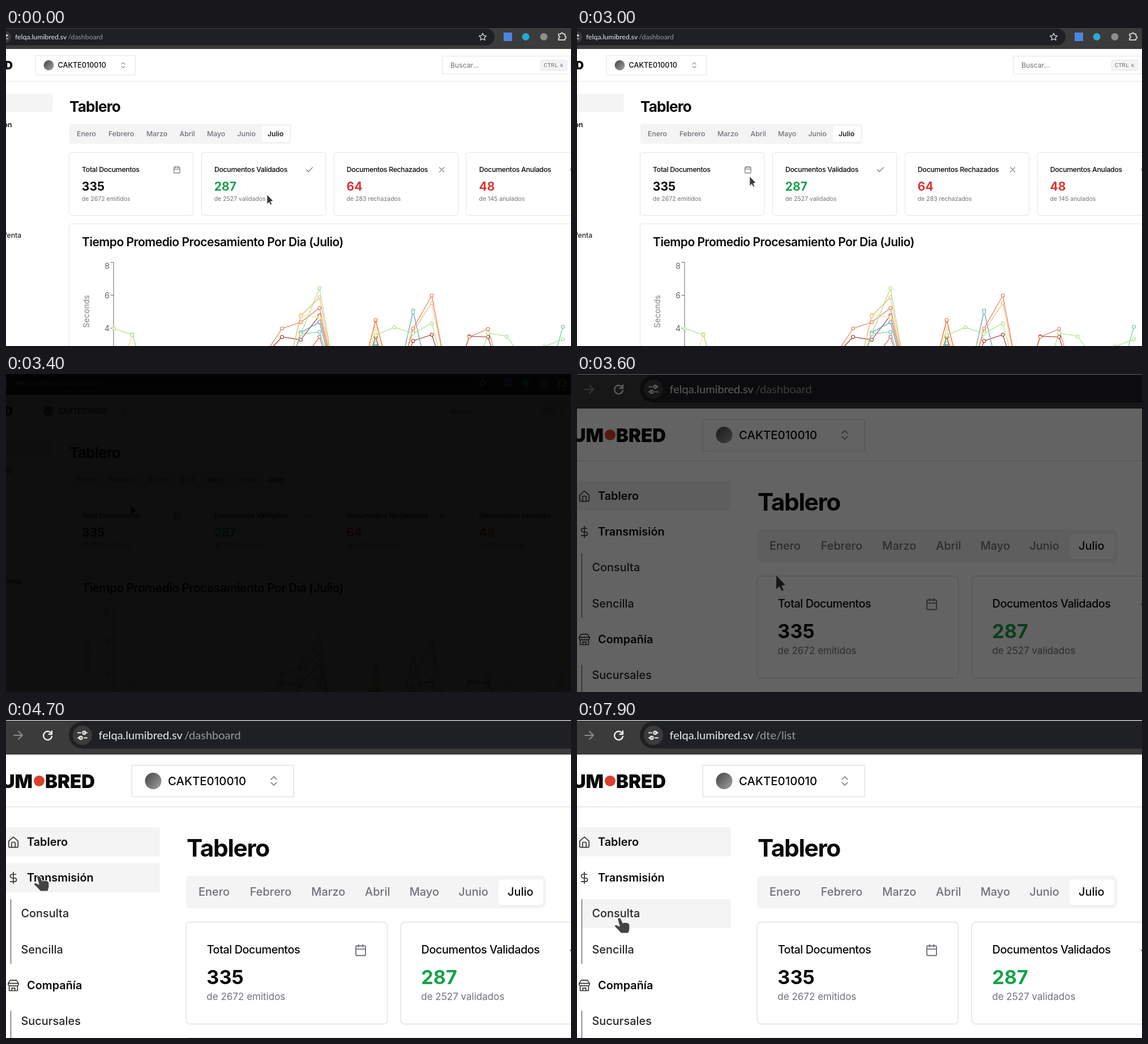
An HTML page that plays this animation: 998x561 px, repeating every 8000 ms.

```html
<!DOCTYPE html>
<html lang="es">
<head>
<meta charset="utf-8">
<title>Tablero</title>
<style>
html, body { margin: 0; width: 100%; height: 100%; overflow: hidden; background: #fff; }
svg { display: block; width: 100vw; height: 100vh; }
text { font-family: Inter, sans-serif; white-space: pre; }
.url { font-family: Lato, sans-serif; }
.mono { font-family: "Liberation Mono", monospace; }
</style>
</head>
<body>
<svg id="stage" viewBox="0 0 998 561"></svg>
<script>
const ZOOM = 1.62, DX = 137.6, DY = 1, CUT = 3425, LOOP = 8000;
const INK = '#09090b', GRAY = '#71717a', LINE = '#e4e4e7', SOFT = '#f4f4f5';

function el(parent, tag, attrs, content) {
  const node = document.createElementNS('http://www.w3.org/2000/svg', tag);
  for (const k in attrs) node.setAttribute(k, attrs[k]);
  if (content) node.textContent = content;
  return parent.appendChild(node);
}
const rect = (p, x, y, x2, y2, fill, more) =>
  el(p, 'rect', { x, y, width: x2 - x, height: y2 - y, fill, ...more });
const text = (p, x, y, size, weight, fill, str, more) =>
  el(p, 'text', { x, y, 'font-size': size, 'font-weight': weight, fill, ...more }, str);
const path = (p, d, stroke, width, more) =>
  el(p, 'path', { d, stroke, 'stroke-width': width, fill: 'none',
    'stroke-linecap': 'round', 'stroke-linejoin': 'round', ...more });
// Icon drawn on a 24 unit grid around a centre
const icon = (p, d, cx, cy, size, color, width = 2) =>
  path(p, d, color, width, { transform: `translate(${cx - size / 2} ${cy - size / 2}) scale(${size / 24})` });

const stage = document.getElementById('stage');
const page = el(stage, 'g', {});

// Browser bar
rect(page, -100, 0, 1000, 37, '#3b3b3b');
rect(page, -16.4, 1, 863, 30.5, '#1f2023', { rx: 14.7 });
icon(page, 'M12 2l3.1 6.6 7 .9-5.1 4.9 1.3 7.1-6.3-3.5-6.3 3.5 1.3-7.1L1.900 9.500l7-.9z', 842, 15.500, 15, '#d6d6d6', 2.200);
rect(page, 879, 8, 894, 23, '#4a86e0');
el(page, 'circle', { cx: 918, cy: 15.500, r: 6.500, fill: '#28a9d6' });
el(page, 'circle', { cx: 950, cy: 15.500, r: 6.500, fill: '#8d8d8d' });
icon(page, 'M3 6h6a3 3 0 0 1 6 0h5v6a3 3 0 0 1 0 6v4H3v-5a3 3 0 0 0 0-6z', 982, 14.500, 16, '#e6e6e6', 2.400);

// Header
rect(page, -100, 93.500, 1000, 94.500, LINE);
rect(page, 770.500, 49.500, 996.500, 81, '#fff', { stroke: LINE });
text(page, 785, 70, 12.300, 400, GRAY, 'Buscar...');
rect(page, 944.500, 56.500, 991, 74.500, SOFT, { stroke: LINE, rx: 2 });
text(page, 950, 69, 10.500, 400, GRAY, 'CTRL', { class: 'mono' });
text(page, 979, 69, 9, 400, GRAY, 'K', { class: 'mono' });

// Month tabs
text(page, 112, 148, 26.200, 700, INK, 'Tablero', { 'letter-spacing': '-.033em' });
rect(page, 111.500, 169, 504, 204.500, SOFT, { rx: 5 });
rect(page, 452, 173.500, 501, 202, '#e6e6e9', { rx: 4 });
rect(page, 452, 173, 501, 201.300, '#fff', { rx: 4 });
Object.entries({ Enero: 125, Febrero: 181, Marzo: 248, Abril: 306.500, Mayo: 355, Junio: 408.500, Julio: 462 })
  .forEach(([name, x]) => text(page, x, 191, 12.300, 500, name === 'Julio' ? INK : GRAY, name));

// Summary cards
const CALENDAR = 'M8 2v4M16 2v4M3 10h18M5 4h14a2 2 0 0 1 2 2v14a2 2 0 0 1-2 2H5a2 2 0 0 1-2-2V6a2 2 0 0 1 2-2z';
[
  ['Total Documentos', '335', 'de 2672 emitidos', INK, CALENDAR],
  ['Documentos Validados', '287', 'de 2527 validados', '#16a34a', 'M22 5L9 18l-6-6'],
  ['Documentos Rechazados', '64', 'de 283 rechazados', '#dc3535', 'M19 5L5 19M5 5l14 14'],
  ['Documentos Anulados', '48', 'de 145 anulados', '#dc3535', 'M12 2a10 10 0 1 0 .1 0zM5 5l14 14']
].forEach(([title, count, note, color, sign], i) => {
  const x = 111.500 + i * 233.900;
  rect(page, x, 219.500, x + 219.300, 330.500, '#fff', { rx: 4.500, stroke: LINE });
  text(page, x + 22.500, 254, 12.300, 500, INK, title, { 'letter-spacing': '-.025em' });
  text(page, x + 22.300, 287, 21.100, 700, color, count);
  text(page, x + 22.300, 304.500, 10.500, 400, GRAY, note);
  icon(page, sign, x + 190.300, 250, 14, GRAY);
});

// Chart
rect(page, 111.500, 345.500, 1060, 800, '#fff', { rx: 4.500, stroke: LINE });
text(page, 134, 384.500, 21.100, 600, INK, 'Tiempo Promedio Procesamiento Por Dia (Julio)', { 'letter-spacing': '-.025em' });
path(page, 'M184.500 413.500H190V800M184.500 471.500H190M184.500 529.500H190', '#666', 1, { 'stroke-linecap': 'butt' });
[[8, 425], [6, 476.500], [4, 534.500]].forEach(([n, y]) =>
  text(page, 183, y, 14, 400, '#666', n, { 'text-anchor': 'end' }));
text(page, 0, 0, 14, 400, '#808080', 'Seconds', { 'text-anchor': 'middle', transform: 'translate(147 500) rotate(-90)' });

// Heights by day; days left out lie below the visible part
const series = [
  ['#9e2b25', { 8: 580, 9: 545, 10: 550, 11: 507, 14: 545, 16: 552, 17: 541, 19: 544, 20: 545 }],
  ['#d5504f', { 10: 590, 11: 545, 14: 560 }],
  ['#4a8fc0', { 10: 537, 11: 519, 14: 558 }],
  ['#66c2a5', { 10: 540, 11: 536, 14: 556, 16: 498, 24: 527 }],
  ['#8fb3c4', { 16: 501 }],
  ['#fdd77f', { 1: 540, 10: 506, 11: 511, 14: 530 }],
  ['#f7b267', { 10: 508, 11: 475, 14: 517, 16: 535, 17: 485 }],
  ['#e4744f', { 8: 580, 9: 530, 10: 519, 11: 494, 14: 515, 16: 530, 17: 472, 19: 545, 20: 531 }],
  ['#a4de7c', { 0: 530, 1: 541, 10: 540, 11: 459, 14: 542, 15: 528, 16: 539, 17: 521, 20: 538, 21: 544, 22: 590, 23: 562, 24: 549 }]
];
const dayX = n => 190 + n * 33.070;
for (const [color, days] of series) {
  const pts = Array.from({ length: 25 }, (_, n) => [dayX(n), days[n] ?? 645]);
  path(page, 'M' + pts.join('L'), color, 1.100);
  for (const [cx, cy] of pts) el(page, 'circle', { cx, cy, r: 2.800, fill: '#fff', stroke: color, 'stroke-width': 1.100 });
}

// Left side, in enlarged units
const side = el(page, 'g', { transform: `scale(${1 / ZOOM}) translate(${-DX} ${-DY})` });
path(side, 'M14 27H29M22 20l7 7-7 7', '#8b8b8b', 2);
path(side, 'M80.500 24.500A7.500 7.500 0 1 0 81 29M81 19.500V25H75.500', '#f0f0f0', 2.300);
el(side, 'circle', { cx: 135, cy: 27, r: 17, fill: '#3b3b3b' });
path(side, 'M127 22.500h5M138 31.500h5M139 22.500h4M127 31.500h4', '#e8e8e8', 2.200);
for (const [cx, cy] of [[138, 22.500], [132, 31.500]])
  el(side, 'circle', { cx, cy, r: 2.600, fill: 'none', stroke: '#e8e8e8', 'stroke-width': 2.200 });
text(side, 163.500, 34, 20, 400, '#ececec', 'felqa.lumibred.sv', { class: 'url' });
const route = text(side, 315, 34, 20, 400, '#9a9a9a', '/dashboard', { class: 'url' });

text(side, 47, 119.500, 33, 900, '#0a0a0a', 'LUM', { 'text-anchor': 'end' });
el(side, 'circle', { cx: 58.500, cy: 107.500, r: 9.500, fill: '#d9402e' });
text(side, 69, 119.500, 33, 900, '#0a0a0a', 'BRED');

rect(side, 222.300, 79.800, 508, 135.500, '#fff', { stroke: LINE, 'stroke-width': 1.620 });
const shade = el(el(side, 'defs', {}), 'linearGradient', { id: 'shade', x1: 0, y1: 0, x2: 1, y2: .8 });
el(shade, 'stop', { offset: .2, 'stop-color': '#555' });
el(shade, 'stop', { offset: .9, 'stop-color': '#919191' });
el(side, 'circle', { cx: 260, cy: 107.500, r: 14.500, fill: 'url(#shade)' });
text(side, 286, 115, 20.400, 500, INK, 'CAKTE010010');
icon(side, 'M7 15l5 5 5-5M7 9l5-5 5 5', 473, 107.500, 23, '#85858c', 1.800);

rect(side, -40, 189, 271.500, 240.500, SOFT);
const spots = [[-40, 252.500, 304], [9, 316, 367], [9, 379, 430.500]].map(([x, y, y2]) =>
  ({ y, y2, node: rect(side, x, y, 271.500, y2, SOFT) }));
path(side, 'M8.500 316V430M8.500 513V620', '#77777d', 1.600, { 'stroke-linecap': 'butt' });
const HOME = 'M3 10l9-8 9 8v10a2 2 0 0 1-2 2H5a2 2 0 0 1-2-2zM8.500 22v-8a2 2 0 0 1 2-2h3a2 2 0 0 1 2 2v8';
const DOLLAR = 'M12 1v22M17 5H9.500a3.500 3.500 0 0 0 0 7h5a3.500 3.500 0 0 1 0 7H6';
const STORE = 'M2 8l4-6h12l4 6zM2 8v2a3 3 0 0 0 5 2 3.500 3.500 0 0 0 5 0 3.500 3.500 0 0 0 5 0 3 3 0 0 0 5-2V8M4 13v9h16v-9M9 22v-5h6v5';
[
  ['Tablero', HOME], ['Transmisión', DOLLAR], ['Consulta'], ['Sencilla'],
  ['Compañía', STORE], ['Sucursales'], ['Puntos de Venta']
].forEach(([name, sign], i) => {
  const y = 215 + i * 63.200;
  text(side, sign ? 37 : 26.500, y + 7, 19.900, sign ? 600 : 500, sign ? INK : '#27272a', name);
  if (sign) icon(side, sign, 13, y + .5, 22, '#333', 1.800);
});

// Pointers, both with the tip at 0,0
const look = ['#f4f4f4', 1.200];
const arrow = path(side, 'M0 0V27L6 21.500 10 29.500 14 27.500 10.500 20 17 18z', ...look, { fill: '#3a3a3a' });
const hand = path(side, 'M-3.500 2Q-1 -1.500 2.500 1L6 9 9 8 13 8.500Q17.500 9 18 13V20L16 27H2.500L-3 21-8.500 15.500Q-9 11.500-5 12.500L0 15z', ...look, { fill: '#444' });

const cover = rect(stage, 0, 0, 998, 561, '#000');

// time, x, y, exponent of the ease leading here
const track = [
  [0, 884.400, 477.300, 1], [3000, 631.700, 425.400, 4], [3400, 494, 375, 1], [3800, 209, 333, 1],
  [4300, 72, 283, .7], [4700, 58, 275, .7], [4900, 58, 275, 1], [5500, 75, 349, 1.300]
];
function pointer(t) {
  const i = track.findIndex(k => k[0] > t);
  if (i < 0) return track[track.length - 1].slice(1, 3);
  const [t0, x0, y0] = track[i - 1], [t1, x1, y1, ease] = track[i];
  const k = ((t - t0) / (t1 - t0)) ** ease;
  return [x0 + (x1 - x0) * k, y0 + (y1 - y0) * k];
}
function fade(t) {
  const k = t < CUT ? (t - 3000) / (CUT - 3000) : 1 - (t - CUT) / 450;
  return Math.max(0, Math.min(1, k));
}

function draw(now) {
  const t = Math.floor(now % LOOP / 100) * 100; // ten pictures a second
  page.setAttribute('transform', t < CUT ? '' : `translate(${DX} ${DY}) scale(${ZOOM})`);
  cover.setAttribute('opacity', fade(t));
  route.textContent = t < 7400 ? '/dashboard' : '/dte/list';
  const [x, y] = pointer(t);
  let over = false;
  for (const s of spots) {
    const hit = x < 271 && y >= s.y && y <= s.y2;
    s.node.setAttribute('visibility', hit ? 'visible' : 'hidden');
    over = over || hit;
  }
  arrow.setAttribute('visibility', over ? 'hidden' : 'visible');
  hand.setAttribute('visibility', over ? 'visible' : 'hidden');
  for (const p of [arrow, hand]) p.setAttribute('transform', `translate(${x} ${y})`);
}
const start = performance.now();
function tick() {
  draw(performance.now() - start);
  requestAnimationFrame(tick);
}
tick();
</script>
</body>
</html>
```
